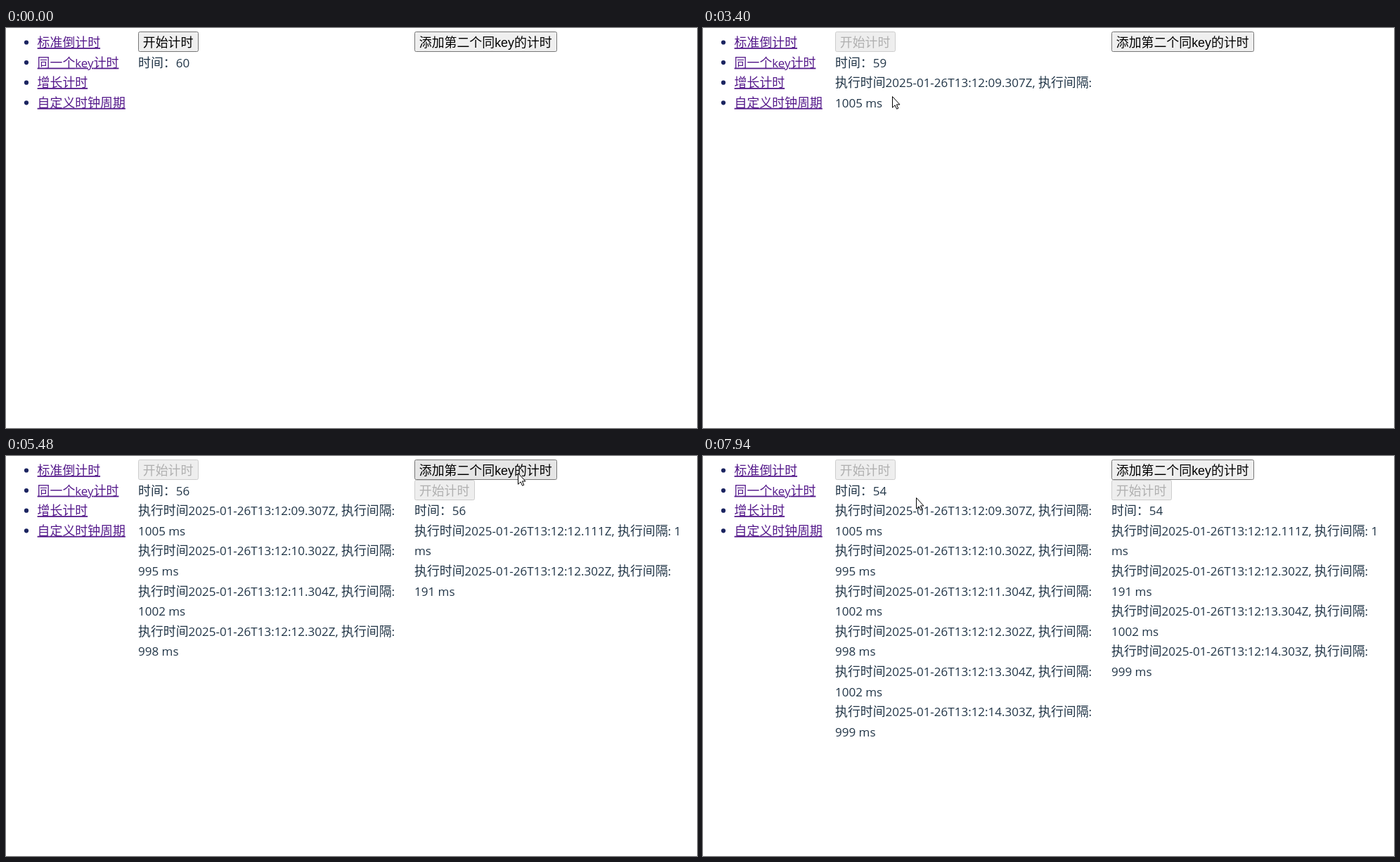
An HTML page that plays this animation: 983x569 px, repeating every 8 s.

```html
<!DOCTYPE html>
<html lang="zh-CN">
<head>
<meta charset="utf-8">
<style>
html, body { margin: 0; width: 100%; height: 100%; overflow: hidden; background: #fff; }
svg { display: block; width: 983px; height: 569px; }
text { font: 17.9px "Noto Sans CJK SC", "Noto Sans CJK", sans-serif; fill: #213547; white-space: pre; }
tspan { font: 17px "Open Sans", "Noto Sans", sans-serif; }
.link { fill: #551a8b; text-decoration: underline; text-decoration-thickness: 1.2px; text-underline-offset: 2px; }
.button text { fill: #000; }
.button tspan { font: 17.9px "Liberation Sans", sans-serif; }
.button rect { fill: #efefef; stroke: #767676; }
.hover rect { fill: #e5e5e5; }
.active rect { fill: #f5f5f5; }
.disabled rect { fill: #eee; stroke: #cdcdcd; }
.disabled text { fill: #b0b0b0; }
</style>
</head>
<body>
<svg id="stage" viewBox="0 0 983 569"></svg>
<script>
const LOOP = 8000, ROW = 28.6, LEFT = 188, RIGHT = 581;
const FIRST_TICK = 2475, PERIOD = 1000, FIRST_CLICK = 1470, SECOND_CLICK = 5279, PRESS = 120;
const tickAt = n => FIRST_TICK + n * PERIOD - Math.min(n, 1) * 5;
const stage = document.getElementById("stage");

// Latin runs get their own font inside the Chinese text
const mix = s => s.replace(/[ -~]+/g, "<tspan>$&</tspan>");
const line = (x, row, s, attrs = "") =>
  `<text x="${x}" y="${27 + row * ROW}" ${attrs}>${mix(s)}</text>`;
const button = (id, x, row, w, s, cls = "") =>
  `<g id="${id}" class="button ${cls}"><rect x="${x + .5}" y="${5.5 + row * 29}" width="${w}" height="28" rx="2"/>` +
  line(x + 6.8, row, s) + "</g>";

// One log: each gap is the distance to the stamp before it
function log(x, row, before, stamps, shownAt) {
  return stamps.map((ms, i) => {
    const gap = ms - (i ? stamps[i - 1] : before);
    const head = `执行时间${new Date(Date.UTC(2025, 0, 26, 13, 12, 0, ms)).toISOString()}, 执行间隔:`;
    const [a, b] = gap < 10 ? [`${head} ${gap}`, "ms"] : [head, gap + " ms"];
    return `<g data-at="${shownAt(i)}">${line(x, row + 2 * i, a)}${line(x, row + 2 * i + 1, b)}</g>`;
  }).join("");
}

const ticks = [9307, 10302, 11304, 12302, 13304, 14303];
const links = ["标准倒计时", "同一个key计时", "增长计时", "自定义时钟周期"];

stage.innerHTML =
  links.map((s, i) => `<circle cx="29" cy="${20.5 + i * ROW}" r="3.1" fill="#1b2460"/>` +
    line(44.6, i, s, 'class="link"')).join("") +
  button("start", LEFT, 0, 85, "开始计时") +
  line(LEFT, 1, "", 'id="timeLeft"') +
  log(LEFT, 2, 8302, ticks, tickAt) +
  button("add", RIGHT, 0, 202, "添加第二个同key的计时") +
  `<g data-at="${SECOND_CLICK}">` + button("second", RIGHT, 1, 85, "开始计时", "disabled") +
  line(RIGHT, 2, "", 'id="timeRight"') + "</g>" +
  log(RIGHT, 3, 12110, [12111, ...ticks.slice(3)], i => i ? tickAt(i + 2) : SECOND_CLICK) +
  `<path id="cursor" d="M.5 .5V16.2L4.1 12.8 6.6 18.2 8.8 17.2 6.4 11.9H11Z" fill="#fff" stroke="#000"/>`;

const $ = id => document.getElementById(id);
const timed = [...stage.querySelectorAll("[data-at]")];

// Pointer stops: x, y, arrival and, after a rest, departure
const stops = [
  [890, 546, 70], [428, -34, 190, 450], [357, 119, 760], [230, 17, 1190, 1500],
  [291, 72, 1870, 2620], [347, 60, 2850], [226, 104, 3200], [269, 97, 3400],
  [341, 110, 4210, 4330], [739, 20, 4960, 5300], [573, 77, 6440, 6710],
  [640, 86, 7470], [303, 59, 7940, LOOP]
];

function pointer(t) {
  const i = stops.findLastIndex(s => t >= s[2]);
  if (i < 0) return [-50, -50];
  const [x0, y0, arrive, leave = arrive] = stops[i], [x1, y1, end] = stops[i + 1] || stops[i];
  const u = t <= leave ? 0 : (t - leave) / (end - leave), k = u * u * (3 - 2 * u);
  return [x0 + (x1 - x0) * k, y0 + (y1 - y0) * k];
}

function buttonState(x, y, left, width, pressed) {
  const over = x >= left && x <= left + width && y >= 5 && y <= 34;
  return "button" + (pressed ? " active" : over ? " hover" : "");
}

function draw(now) {
  const t = now % LOOP, [x, y] = pointer(t);
  const pressed = click => t >= click - PRESS && t < click;
  const count = 60 - ticks.filter((_, i) => t >= tickAt(i)).length;
  for (const el of timed) el.style.display = t >= +el.dataset.at ? "" : "none";
  $("timeLeft").innerHTML = $("timeRight").innerHTML = mix("时间：" + count);
  $("start").setAttribute("class", t >= FIRST_TICK ? "button disabled"
    : buttonState(x, y, LEFT, 86, pressed(FIRST_CLICK)));
  $("add").setAttribute("class", buttonState(x, y, RIGHT, 203, pressed(SECOND_CLICK)));
  $("cursor").setAttribute("transform", `translate(${Math.round(x)} ${Math.round(y)})`);
  requestAnimationFrame(draw);
}
draw(0);
</script>
</body>
</html>
```
